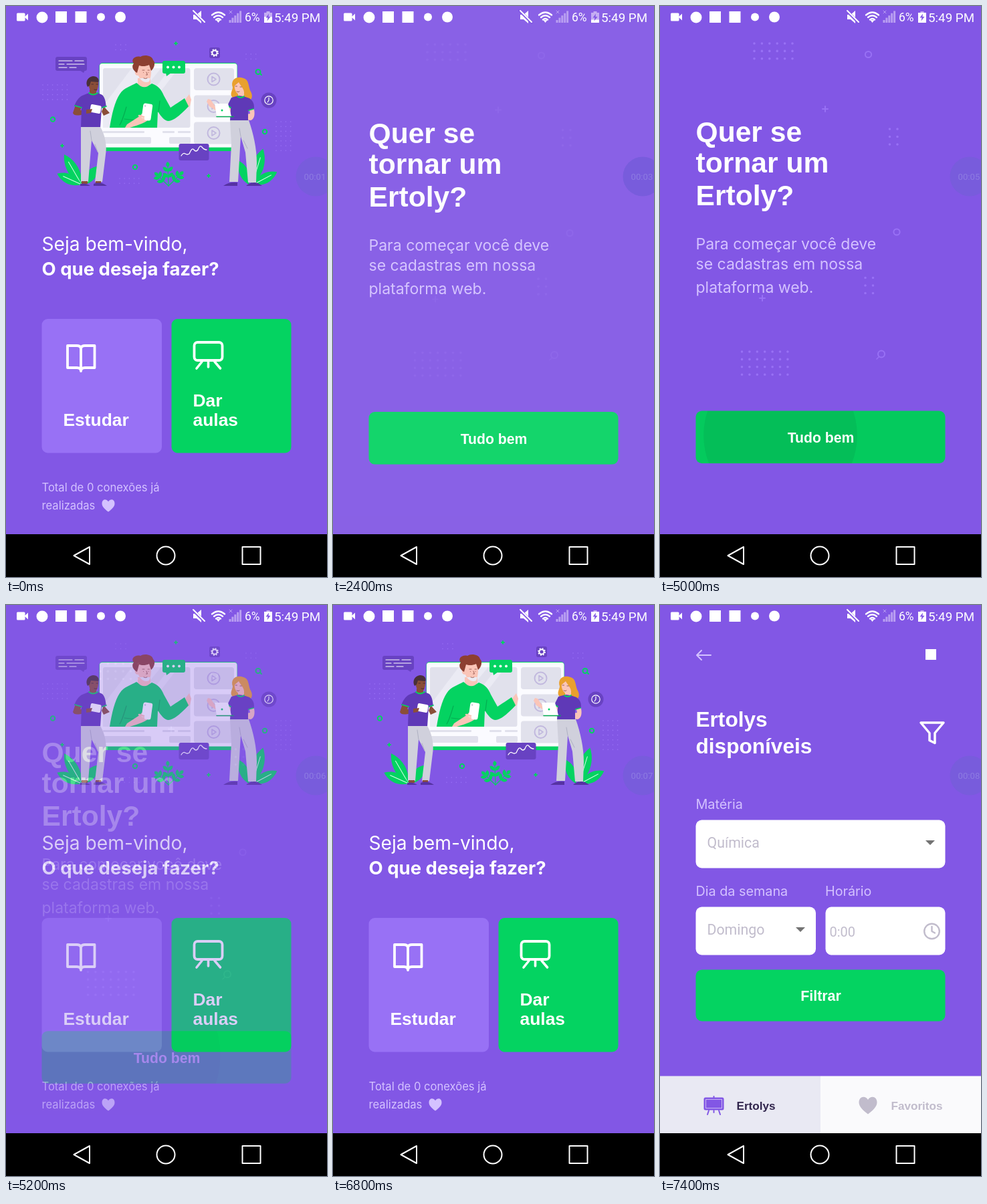
Recreate the animation shown at these times as an HTML page. Size 480x854 px, loop 8000 ms.

```html
<!DOCTYPE html>
<html lang="pt-BR">
<head>
<meta charset="utf-8">
<style>
html, body { margin: 0; width: 100%; height: 100%; overflow: hidden; background: #000 }
svg { display: block; width: 480px; height: 854px }
text { fill: #fff }
.b { font-family: "Liberation Sans", Arial, sans-serif; font-weight: 700 }
.p { font-family: Inter, sans-serif }
.r { font-family: Roboto, sans-serif }
.soft text, text.soft { fill: #d4c2ff }
.gray text { fill: #c1bccc }
.line { fill: none; stroke: #fff; stroke-linecap: round; stroke-linejoin: round }
</style>
</head>
<body>
<script>
const GREEN = '#04d361', PURPLE = '#8257e5', DARK = '#6842c2', SHIRT = '#5f39b7';
const SKIN = '#fac5b8', BROWN = '#8a4e38', CLOTH = '#d0d0dc', GRAY = '#e1e1ec';

const text = (cls, size, x, y, s, extra = '') =>
  `<text class="${cls}" font-size="${size}" x="${x}" y="${y}" ${extra}>${s}</text>`;
const box = (x, y, w, h, fill, r = 0) =>
  `<rect x="${x}" y="${y}" width="${w}" height="${h}" rx="${r}" fill="${fill}"/>`;
const shape = (fill, d) => `<path fill="${fill}" d="${d}"/>`;
const line = (d, w, color = '#fff') => `<path class="line" style="stroke:${color}" stroke-width="${w}" d="${d}"/>`;
const disc = (x, y, r, fill) => `<circle cx="${x}" cy="${y}" r="${r}" fill="${fill}"/>`;
const ring = (x, y, r, color, w) =>
  `<circle cx="${x}" cy="${y}" r="${r}" fill="none" stroke="${color}" stroke-width="${w}"/>`;
const plus = (x, y, r, color, w) => line(`M${x - r} ${y}h${2 * r}M${x} ${y - r}v${2 * r}`, w, color);
const heart = (x, y, s, fill) => `<path transform="translate(${x} ${y}) scale(${s})" fill="${fill}"
  d="M0 10C-5 6-10 2-10-3C-10-10-3-11 0-6C3-11 10-10 10-3C10 2 5 6 0 10"/>`;

// Screen background, tall enough to cover the top while it slides
const backdrop = box(0, -80, 480, 870, PURPLE);

function dots(x, y, cols, rows, step, size, color = '#9871f5') {
  let d = '';
  for (let i = 0; i < cols * rows; i++)
    d += `M${x + i % cols * step} ${y + Math.floor(i / cols) * step}h.01`;
  return line(d, size, color);
}

// Button with a clipped touch ripple
const button = (id, x, y, w, h, fill) => `
  <clipPath id="${id}Clip">${box(x, y, w, h, fill, 9)}</clipPath>${box(x, y, w, h, fill, 9)}
  <g id="${id}" clip-path="url(#${id}Clip)">
    <rect x="${x}" y="${y}" width="${w}" height="${h}" opacity=".045"/><circle opacity=".06"/></g>`;

const leaf = (x, y, angle, len, wide, vein = '') => `<g transform="translate(${x} ${y}) rotate(${angle})">
  ${shape(GREEN, `M0 0C${-wide} ${-len * .3} ${-wide} ${-len * .7} 0 ${-len}C${wide} ${-len * .7} ${wide} ${-len * .3} 0 0`)}
  ${vein && line(`M0 0V${-len * .75}`, 1, vein)}</g>`;

// Leaflets in pairs along a stem
const frond = (x, y, angle, len) => `<g transform="translate(${x} ${y}) rotate(${angle})">
  ${line(`M0 0V${-len + 4}`, 1.2, GREEN)}${leaf(0, -len + 8, 0, 8, 3.5)}
  ${[.35, .6].map(k => leaf(0, -len * k, -48, 10, 3.5) + leaf(0, -len * k, 48, 10, 3.5)).join('')}</g>`;

const videoCard = y => box(281, y, 60, 33, GRAY, 4) + ring(310.5, y + 16.5, 9, '#c1b8de', 2) +
  line(`M308 ${y + 12.5}l6 4l-6 4z`, 1.6, '#c1b8de');

const panel = `
  ${box(139.5, 85, 206.5, 132, GREEN, 5)}${box(140, 86, 205.5, 125.5, '#fbfbff', 4)}
  ${box(145, 93, 130.5, 89, GRAY, 3)}
  ${shape('#ebebf4', 'M145 150L188 93H232L158 182H145ZM246 93H258L190 182H177Z')}
  ${box(145, 187, 62, 3, GRAY, 1)}${box(145, 196, 72, 10, GRAY, 2)}
  ${box(234, 187, 18, 3, GRAY, 1)}${box(257, 187, 19, 3, GRAY, 1)}${box(244, 196, 32, 10, GRAY, 2)}
  ${videoCard(93)}${videoCard(133.5)}${videoCard(173.5)}`;

const teacher = `
  ${shape(SKIN, 'M267 146C266 141 271 136 274 132L277 140L275 150L270 153Z')}
  ${shape(GREEN, 'M155 182C158 162 163 142 170 132C176 122 187 120 195 115C203 121 212 121 218 116C227 119 232 124 236 134L246 152L267 138L273 150C264 160 251 172 243 172C237 172 232 165 227 158L226 182Z')}
  ${line('M180 151C177 161 174 172 170 178M177 169L203 172M230 142L228 158', 1.2, '#04ad51')}
  ${shape(SKIN, 'M197 108V116C202 123 212 123 216 116V108ZM196 87H216C218 97 217 107 214 113C208 116 201 112 198 104C192 105 191 96 196 96Z')}
  ${shape('#8d3f31', 'M196 100C190 97 187 90 191 86C186 80 193 74 201 76C206 72 219 74 220 81C224 84 222 93 217 97L214 88C208 91 202 90 199 89Z')}
  ${line('M204 96h3M212 96h2.500M205.500 99.500h.1M213 99.500h.1M210 99l1.500 4h-2M206 108q3 1.500 5 0', .8, '#8d4b42')}
  ${shape(SKIN, 'M181 177L201 164C204 157 218 157 217 166C212 174 198 178 185 182H178Z')}
  <g transform="rotate(8 211 158)">${box(204, 146, 14, 25, '#fff', 3)}${disc(207, 150, 1.2, '#c5c3d3')}</g>
  ${line('M199 164l7 2M199 168l7 1', 2.5, SKIN)}`;

const student = `
  ${shape(BROWN, 'M104 148L100 160C102 166 112 163 128 160L128 154L111 156L113 150ZM146 150L155 160L146 164L143 158ZM125 125h10v9h-10z')}
  ${shape(SHIRT, 'M114 134L124 130C128 135 133 135 137 130L144 133C149 138 149 146 150 151L143 153L141 182H112L113 152L102 150C104 144 108 137 114 134Z')}
  ${line('M124 130q6 5 13 0M103 149l10 3M144 152l6-2', 1.8, GREEN)}
  ${shape(BROWN, 'M123 111H138C139 121 136 130 131 130C125 128 123 120 123 111Z')}
  ${shape('#493039', 'M122 121C118 114 122 106 130 105C137 105 140 110 138 114L127 113L125 119Z')}
  ${line('M128 117h2.500M135 117h2.500M132 125q2 1 4 0', .8, '#3a2331')}
  <g transform="rotate(10 134 154)">${box(126, 148, 16, 12, '#fff', 2)}</g>
  ${shape(BROWN, 'M120 155l9-1l-2 6l-7 1z')}
  ${shape(CLOTH, 'M112 181H141C149 194 151 211 149 222L144 263H133L138 220L128 201L123 263H112Z')}
  ${line('M128 201L126 187M137 218L133 207', 1, '#aeb0c1')}
  ${shape(BROWN, 'M113 262h9v4h-9zM134 262h8v4h-8z')}
  ${shape('#5632a3', 'M111 269v-3q8-2 15 3zM131 269v-3q10-4 20 3z')}`;

const tutor = `
  ${shape('#e9a02e', 'M339 137C334 132 338 128 339 122C335 110 345 104 355 108C364 110 362 121 366 128C371 138 365 143 357 143Z')}
  ${shape(SKIN, 'M335 148L328 156L314 152L306 140L302 139L300 143L304 150L324 163L337 158ZM363 152L365 161L340 165L340 168L366 171C372 169 373 160 370 151ZM347 128h9v9h-9z')}
  ${shape(SHIRT, 'M337 137L348 134L355 135L364 138C371 143 371 148 371 154L362 156L362 172H335L336 153L331 149Z')}
  ${line('M346 135q5 4 10 0M331 149l5 3M363 156l7-2', 1.8, GREEN)}
  ${shape(SKIN, 'M342 114C346 111 352 113 357 115C358 127 355 132 348 132C342 129 341 121 342 114Z')}
  ${shape('#e9a02e', 'M341 120C340 111 347 109 355 111C359 116 359 124 357 130C354 121 350 118 348 114Z')}
  ${line('M343 120h2.500M350 121h2.500M345 128q2 1.500 4 0', .8, '#824a45')}
  ${shape('#fff', 'M312 146H332L337 165H315Z')}${line('M315 165.500H340', 1.6, '#04ad51')}${disc(323, 156, 1.5, GREEN)}
  ${shape(CLOTH, 'M335 171H363C370 191 375 213 375 235L374 264H362L358 219L351 195L347 263H334L337 207Z')}
  ${line('M351 195L349 183M361 213L355 201', 1, '#aeb0c1')}
  ${shape('#5632a3', 'M325 269q8-6 21-5v5zM359 269q8-7 18-4l6 4z')}`;

const plants = `
  ${leaf(113, 267, -30, 52, 11, '#d8ffe8')}${leaf(113, 267, -66, 40, 10, '#d8ffe8')}${leaf(116, 267, 38, 35, 10)}
  ${leaf(368, 267, 17, 56, 12, '#d8ffe8')}${leaf(370, 267, 62, 40, 10, '#d8ffe8')}${leaf(363, 267, -22, 38, 9)}
  ${frond(243, 269, -2, 36)}${frond(243, 269, -46, 29)}${frond(243, 269, 46, 31)}`;

const extras = `
  ${dots(164, 58, 3, 2, 7.5, 1.6)}${dots(55, 118, 6, 4, 7.3, 1.6)}${dots(359, 72, 3, 2, 7.3, 1.6)}
  ${dots(404, 173, 4, 7, 7.2, 1.6)}${dots(170, 258, 5, 2, 7.2, 1.6)}
  ${ring(70, 169.5, 3.2, GREEN, 2)}${ring(377, 98.5, 3.5, GREEN, 2)}${line('M380 101l2 2', 2, GREEN)}
  ${ring(193, 241, 3.2, GREEN, 2)}${ring(387, 188, 3.2, GREEN, 2)}
  ${plus(254, 56, 2, GREEN, 2)}${plus(84, 209, 2, GREEN, 2)}${plus(303, 254, 2, GREEN, 2)}
  ${box(74, 76, 47, 21, DARK, 3)}${shape(DARK, 'M110 96h8l-2 4z')}
  ${line('M79 82h20M103 82h13M79 87h8M91 87h26M79 92h12M95 92h10', 1.2)}
  ${box(304, 62, 16, 16, DARK, 3)}${ring(312, 70, 3.6, '#fff', 2)}
  <circle cx="312" cy="70" r="5" fill="none" stroke="#fff" stroke-width="1.8" stroke-dasharray="1.9 2.03"/>
  ${disc(393, 141, 11.5, DARK)}${ring(393, 141, 6.2, '#fff', 1.2)}${line('M393 137v4l-2 3', 1.2)}
  ${box(234, 82, 34, 19, GREEN, 3)}${shape(GREEN, 'M239 100h8l-7 5z')}
  ${disc(242, 91.5, 2, '#fff')}${disc(250.5, 91.5, 2, '#fff')}${disc(259, 91.5, 2, '#fff')}
  ${box(258.5, 206, 45, 25, DARK, 3)}${line('M262 224q3-5 6-3t6 0q4-10 7-6t6 0q3-8 6-4t7 4', 1.3)}`;

const home = `<g id="home">${backdrop}
  ${plants}${panel}${extras}${teacher}${student}${tutor}
  ${text('p', 28.2, 53.5, 366, 'Seja bem-vindo,')}
  ${text('p', 27.5, 53.5, 403, 'O que deseja fazer?', 'font-weight="700"')}
  ${button('study', 53.5, 468, 179.5, 200.5, '#9871f5')}
  ${button('teach', 247.5, 468, 179, 200.5, GREEN)}
  ${line('M112 513Q112 508 106 508H92V541H106Q112 541 112 546V513Q112 508 118 508H132.500V541H118Q112 541 112 546', 3.8)}
  <rect class="line" x="281.500" y="503" width="42" height="27" rx="5" stroke-width="3.800"/>
  ${line('M293 532l-8 10M302.500 531v9M312 532l8.500 10', 3.6)}
  ${text('b', 26.4, 85.5, 628, 'Estudar')}
  ${text('b', 26.4, 279.5, 599, 'Dar')}${text('b', 26.4, 279.5, 628, 'aulas')}
  ${text('p soft', 16.6, 53.5, 726, 'Total de 0 conexões já')}${text('p soft', 16.6, 53.5, 752.5, 'realizadas')}
  ${heart(153, 747, .95, '#d4c2ff')}</g>`;

const DECO = '#9871f5';
const become = `<g id="become">${backdrop}
  <g id="deco">${dots(141, 56, 6, 3, 11.4, 3.6)}${dots(343.5, 184, 2, 3, 11.5, 3.6)}
  ${dots(307, 406.5, 2, 3, 11.5, 3.6)}${dots(122.5, 517, 7, 4, 11.4, 3.6)}
  ${ring(311.5, 72.5, 4.6, DECO, 2)}${ring(354, 338, 4.6, DECO, 2)}${ring(331, 520.5, 5, DECO, 2)}
  ${line('M327 525l-3 3', 1.5, DECO)}${plus(247, 154, 4, DECO, 2)}${plus(153, 437, 4, DECO, 2)}</g>
  ${text('b', 42.6, 53.5, 203, 'Quer se')}${text('b', 42.6, 53.5, 249, 'tornar um')}${text('b', 42.6, 53.5, 298, 'Ertoly?')}
  <g class="soft">${text('p', 23, 53.5, 364, 'Para começar você deve')}
  ${text('p', 23, 53.5, 394, 'se cadastras em nossa')}${text('p', 23, 53.5, 429, 'plataforma web.')}</g>
  ${button('ok', 53.5, 605.5, 373, 78.5, GREEN)}
  ${text('b', 21.2, 240.5, 653, 'Tudo bem', 'text-anchor="middle"')}</g>`;

const list = `<g id="list">${backdrop}
  ${line('M76 75H55M62 68l-7 7l7 7', 2, '#d4c2ff')}${box(397, 66, 16, 16, '#fff')}
  ${text('b', 31.6, 53.5, 182, 'Ertolys')}${text('b', 31.6, 53.5, 221.5, 'disponíveis')}
  ${line('M390 176H424L411 191.500V206.500L403 202.500V191.500Z', 3.5)}
  <g class="soft">${text('p', 19.8, 53.5, 305, 'Matéria')}${text('p', 19.8, 53.5, 435, 'Dia da semana')}${text('p', 19.8, 247, 435, 'Horário')}</g>
  ${box(53.5, 321.5, 373, 72, '#fff', 9)}${box(53.5, 451.5, 179.5, 72, '#fff', 9)}${box(247.5, 451.5, 179, 72, '#fff', 9)}
  <g class="gray">${text('r', 21.3, 70.5, 363, 'Química')}${text('r', 21.3, 70.5, 493, 'Domingo')}${text('r', 20, 253.5, 496, '0:00')}</g>
  ${shape('#737373', 'M397 352h14l-7 7zM203 482h14l-7 7z')}
  ${ring(406.5, 488, 11.3, '#c1bccc', 2.4)}${line('M406.500 481v7l4.500 2.500', 2.4, '#c1bccc')}
  ${box(53.5, 545.5, 373, 77, GREEN, 9)}${text('b', 21.4, 240.5, 592, 'Filtrar', 'text-anchor="middle"')}
  ${box(0, 704.5, 240, 85.5, '#e9e9f3')}${box(240, 704.5, 240, 85.5, '#fafafc')}
  <rect x="67" y="738" width="27" height="16" fill="${PURPLE}" stroke="${PURPLE}" stroke-width="3" rx="1"/>
  <rect x="68.500" y="739.500" width="24" height="13" fill="none" stroke="#c8b7f3" stroke-width="1"/>
  ${line('M80.500 735v2M73 756l-2 6M80.500 756v3M88 756l2 6', 2, PURPLE)}
  ${text('b', 17.1, 114.5, 754.5, 'Ertolys', 'style="fill:#32264d"')}
  ${heart(311, 748, 1.35, '#c1bccc')}${text('b', 17.1, 345.5, 754.5, 'Favoritos', 'style="fill:#c1bccc"')}</g>`;

const chrome = `
  ${disc(463, 255, 29.5, '#785cdc')}
  <text id="timer" class="r" font-size="13.2" x="445.5" y="260" style="fill:#8d7be2"></text>
  ${box(16, 10.5, 12.5, 12, '#fff', 1.5)}${shape('#fff', 'M28 16l5-4.500v10l-5-4.500z')}
  ${disc(54, 17, 8.5, '#fff')}${box(74, 8, 17, 17, '#fff')}${box(103.5, 8, 17, 17, '#fff')}
  ${disc(142, 16.5, 6, '#fff')}${disc(171, 16.5, 8, '#fff')}
  ${shape('#fff', 'M280 13h5l7-6v19l-7-6h-5z')}${line('M279 7l18 18', 4, PURPLE)}${line('M280 7l17 17', 2)}
  ${line('M308 13.500q9.500-8 19 0M311 17q6.500-5.500 13 0M314 20.500q3.500-3 7 0', 2.4)}${shape('#fff', 'M314.500 21h6l-3 4z')}
  ${[0, 1, 2, 3, 4].map(i => box(333.5 + i * 3.9, 21 - i * 3.4, 3, 4 + i * 3.4, '#b99ff1')).join('')}
  ${line('M334 7l4 4M338 7l-4 4', 1, '#b99ff1')}
  ${text('r', 17.5, 357, 23, '6%')}${text('r', 18.8, 401, 23.5, '5:49 PM')}
  ${shape('#c4adf3', 'M386 10h3.500v-2h5v2h3.500v15h-12z')}
  <rect id="charge" x="386" width="12" fill="#fff"/>
  ${shape(PURPLE, 'M393 11.500l-4.500 6h3l-1 5l5-6.500h-3z')}
  ${box(0, 790, 480, 64, '#000')}
  ${line('M101.500 822l23.500-13v26z', 2)}${ring(239, 822, 13.5, '#fff', 2)}
  <rect class="line" x="353.500" y="809" width="27" height="26" stroke-width="2"/>`;

document.body.innerHTML = `<svg viewBox="0 0 480 854">${box(0, 0, 480, 790, '#f0f0f7')}
  ${home}${become}${list}${chrome}</svg>`;

const $ = id => document.getElementById(id);
const clamp = v => Math.max(0, Math.min(1, v));

// A screen fades in while rising 8% of the height
function reveal(id, p) {
  const alpha = p < .5 ? p / 2 : p < .9 ? .25 + (p - .5) * 1.125 : .7 + (p - .9) * 3;
  $(id).setAttribute('opacity', alpha);
  $(id).setAttribute('transform', `translate(0 ${68 * (1 - p)})`);
}
const opening = (t, start) => 1 - (1 - clamp((t - start) / 350)) ** 5;

function ripple(id, t, start, end, x, y) {
  const g = $(id), c = g.lastElementChild;
  g.style.display = t >= start && t < end ? '' : 'none';
  c.setAttribute('cx', x);
  c.setAttribute('cy', y);
  c.setAttribute('r', Math.max(0, 38 + (t - start) * .128));
}

const ticks = [1000, 2000, 3000, 4000, 5200, 6200, 7000];
const charges = [[0, .6], [1000, .25], [1800, .8], [2400, .3], [3400, .6], [4000, .8], [4400, 1], [5400, .5], [6200, .8], [6800, 1]];

function draw(now) {
  const t = Math.floor(now % 8000 / 200) * 200;
  const away = t > 2215 && t < 5100 || t > 7040;
  $('home').style.display = away ? 'none' : '';
  reveal('become', t < 5100 ? opening(t, 2215) : 1 - clamp((t - 5130) / 150));
  reveal('list', opening(t, 7040));
  $('deco').setAttribute('opacity', clamp((t - 2325) / 300));
  ripple('teach', t, 1400, 2400, 340, 580);
  ripple('ok', t, 4400, 5400, 180, 642);
  ripple('study', t, 7000, 7400, 145, 580);
  $('timer').textContent = '00:0' + (1 + ticks.filter(s => t >= s).length);
  const level = 15 * charges.filter(c => t >= c[0]).pop()[1];
  $('charge').setAttribute('y', 25 - level);
  $('charge').setAttribute('height', level);
  requestAnimationFrame(draw);
}
requestAnimationFrame(draw);
</script>
</body>
</html>
```
